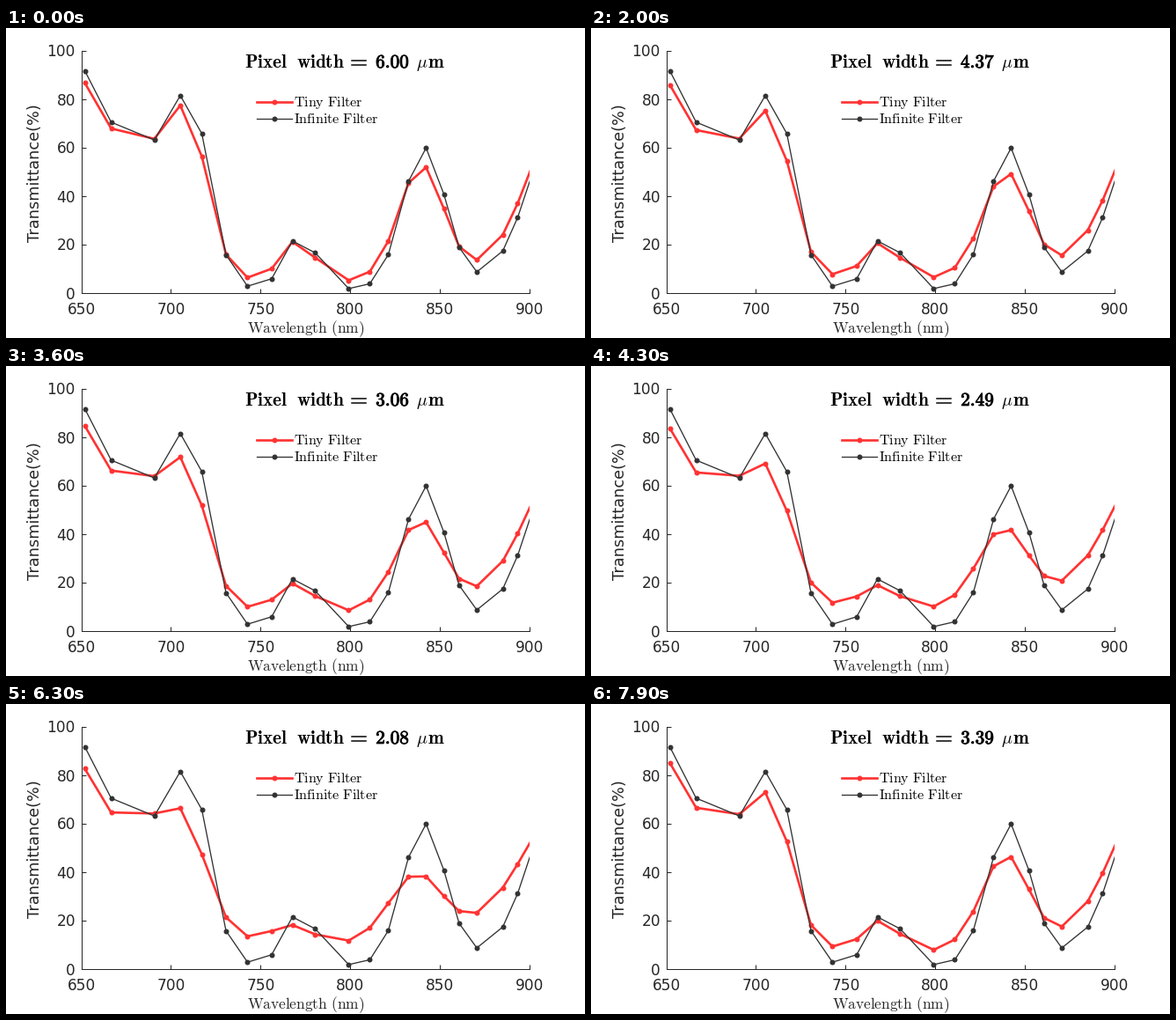
A matplotlib script that plays this animation: 658 by 352 pixels, repeating every 8 s.

```python
import numpy as np
import matplotlib.pyplot as plt
from matplotlib.animation import FuncAnimation
from matplotlib.lines import Line2D
from matplotlib.patheffects import withStroke

W, H, DPI = 658, 352, 100
PX = 72 / DPI                      # points per pixel
LEFT, RIGHT, TOP, BOTTOM = 85.5, 594.5, 25.5, 300.5
RED, DARK, INK = (1, .2, .2), (.2, .2, .2), (.15, .15, .15)

FRAMES, INTERVAL = 80, 100
STEPS, HOLD_END = 49, 62
W_MAX, W_MIN = 6.0, 2.0
BLUE_SHIFT = 1.2                   # nm

plt.rcParams.update({"font.family": "DejaVu Sans", "mathtext.fontset": "cm"})

# Sampled wavelengths; the last lies just outside the plot
NM = np.array([652, 666.7, 690.8, 705.3, 717.3, 730.8, 742.8, 756.3, 767.9,
               780.6, 799.3, 811.1, 821.4, 832.7, 842.5, 852.4, 860.9, 870.8,
               885.3, 893.6, 902.5])


def step(x, height, center, scale):
    return height / (1 + np.exp(-(x - center) / scale))


def bump(x, height, center, sigma):
    return height * np.exp(-((x - center) / sigma) ** 2 / 2)


def infinite_filter(x):
    return (1.3 + 30.3 * np.exp(-(x - 652) / 12.2)
            + step(x, 60, 725.5, -4.5) + step(x, 92, 901, 10)
            + bump(x, 24.8, 709.5, 6.7) + bump(x, 22.9, 772.5, 8.9)
            + bump(x, 58.4, 841.5, 12))


def narrow_filter(x):
    return (10.3 + 19 * np.exp(-(x - 652) / 5)
            + step(x, 53, 721.5, -7) + step(x, 75, 897, 15)
            + bump(x, 7, 705, 8) + bump(x, 7.5, 766.5, 12)
            + bump(x, 27, 836.5, 15.3))


def tiny_filter(x, width):
    """Blend from the blue-shifted ideal to the narrowest filter."""
    ideal = infinite_filter(x + BLUE_SHIFT)
    return ideal + W_MIN / width * (narrow_filter(x) - ideal)


def pixel_width(frame):
    steps = min(frame, STEPS) - max(0, frame - HOLD_END)
    return W_MAX - (W_MAX - W_MIN) * steps / STEPS


fig = plt.figure(figsize=(W / DPI, H / DPI), dpi=DPI, facecolor="white")


def text(x, y, s, size, color="black", ha="center", **kw):
    return fig.text(x / W, 1 - y / H, s, fontsize=size * PX, color=color,
                    ha=ha, va="baseline", **kw)


def rule(x0, x1, y, **style):
    fig.add_artist(Line2D([x0 / W, x1 / W], [1 - y / H] * 2, **style))


def series_style(color, line_px):
    return dict(color=color, lw=line_px * PX, marker="o", ms=6 * PX,
                mew=0, solid_joinstyle="round")


red_style, dark_style = series_style(RED, 2.67), series_style(DARK, 1.33)

ax = fig.add_axes([LEFT / W, 1 - BOTTOM / H,
                   (RIGHT - LEFT) / W, (BOTTOM - TOP) / H])
ax.set(xlim=(650, 900), ylim=(0, 100), facecolor="none",
       xticks=range(650, 901, 50), yticks=range(0, 101, 20))
ax.tick_params(direction="in", length=5 * PX, width=PX, color=INK,
               labelbottom=False, labelleft=False)
for side, spine in ax.spines.items():
    spine.set(visible=side in ("left", "bottom"), linewidth=PX, color=INK)

for i in range(6):
    text(LEFT + .5 + i * (RIGHT - LEFT) / 5, 325, str(650 + 50 * i), 17, INK)
    text(79, BOTTOM + 7 - i * (BOTTOM - TOP) / 5, str(20 * i), 17, INK,
         ha="right")
text(340.5, 346, r"$\mathrm{Wavelength\ (nm)}$", 17.3, INK)
text(38, 164.5, "Transmittance(%)", 17.7, INK, rotation=90,
     rotation_mode="anchor")

# Title: words centred in their slots; digits and equals sign made heavy
for x, word in ((295.5, "Pixel"), (357, "width"), (488.5, "m")):
    text(x, 45, rf"$\mathbf{{{word}}}$", 21.2)
text(473, 45, r"$\mu$", 20)
for y in (37, 41.5):
    rule(393, 409, y, color="black", lw=1.5 * PX)
number = text(439.5, 45, "", 21.2, path_effects=[
    withStroke(linewidth=.9 * PX, foreground="black")])

for y, name, style in ((84, r"Tiny\ Filter", red_style),
                       (103.5, r"Infinite\ Filter", dark_style)):
    rule(285, 325, y, **{**style, "marker": ""})
    fig.add_artist(Line2D([305 / W], [1 - y / H], **style))
    text(327, y + 5, rf"$\mathrm{{{name}}}$", 16.1, ha="left")

red_line, = ax.plot(NM, tiny_filter(NM, W_MAX), **red_style)
ax.plot(NM, infinite_filter(NM), **dark_style)


def update(frame):
    width = pixel_width(frame)
    red_line.set_ydata(tiny_filter(NM, width))
    number.set_text(rf"$\mathbf{{{width:.2f}}}$")
    return red_line, number


anim = FuncAnimation(fig, update, frames=FRAMES, interval=INTERVAL,
                     repeat=True, repeat_delay=0)
plt.show()
```
